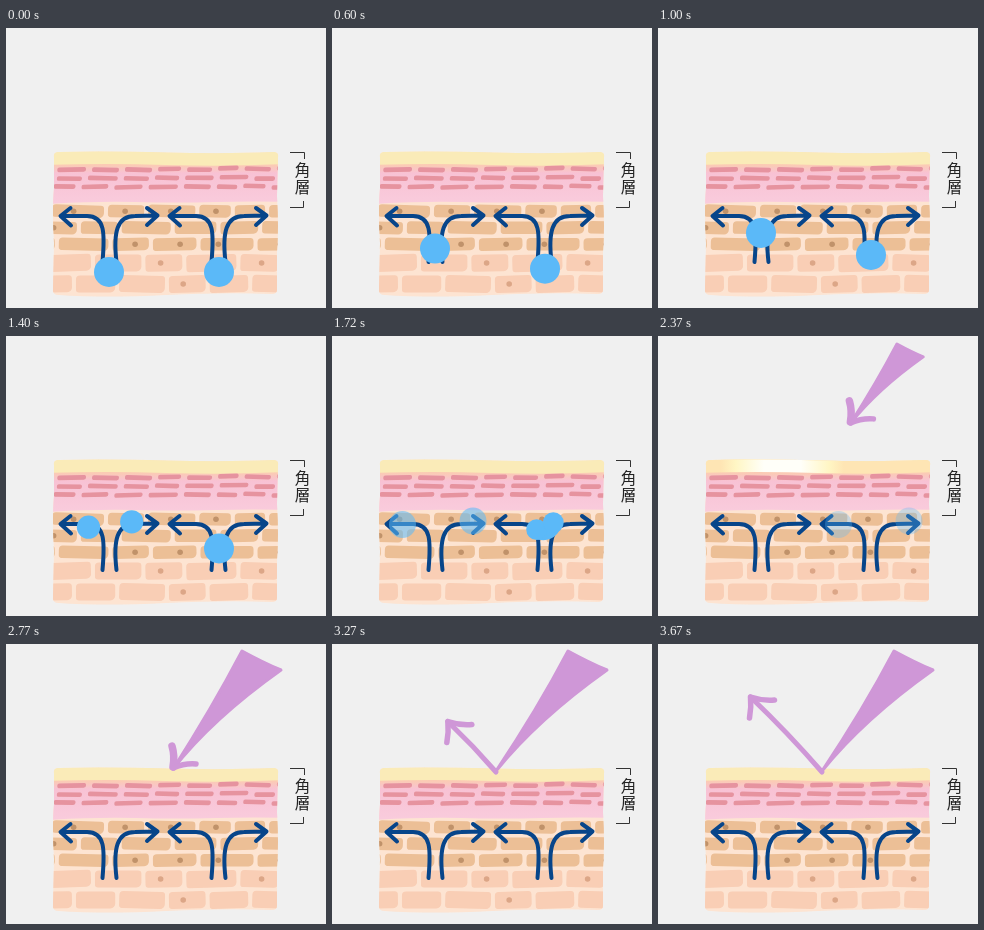
Recreate the animation shown at these times as an HTML page with a canvas. Size 320 by 280 pixels, loop 3970 ms.

```html
<!DOCTYPE html>
<html lang="ja">
<head>
<meta charset="utf-8">
<title>角層</title>
<style>
  html, body { margin: 0; width: 100%; height: 100%; overflow: hidden; background: #f0f0f0; }
  canvas { position: absolute; left: 0; top: 0; width: 320px; height: 280px; }
  .label {
    position: absolute; left: 288px; top: 133px; width: 17px;
    font: 15.5px/17px "Noto Sans CJK JP", "Noto Sans CJK", sans-serif;
    color: #222; text-align: center;
  }
</style>
</head>
<body>
<canvas id="stage"></canvas>
<div class="label">角<br>層</div>
<script>
const LOOP = 3970;
const NAVY = '#07458a', BLUE = '#5bb9f8', PURPLE = '#cf97d7';
const LEFT = 47, RIGHT = 272;
const canvas = document.getElementById('stage');
const ctx = canvas.getContext('2d');
const dpr = window.devicePixelRatio || 1;
canvas.width = 320 * dpr;
canvas.height = 280 * dpr;

const clamp = v => Math.max(0, Math.min(1, v));
const lerp = (a, b, p) => a + (b - a) * p;
const span = (t, a, b) => clamp((t - a) / (b - a));

// Piecewise linear value through [time, value] pairs
function track(t, keys) {
  let [t0, v0] = keys[0];
  for (const [t1, v1] of keys) {
    if (t < t1) return lerp(v0, v1, span(t, t0, t1));
    [t0, v0] = [t1, v1];
  }
  return v0;
}

function seeded(seed) {
  return () => {
    seed = (seed * 16807) % 2147483647;
    return seed / 2147483647;
  };
}

function stroke(d, color, width) {
  ctx.strokeStyle = color;
  ctx.lineWidth = width;
  ctx.stroke(new Path2D(d));
}

function disc(x, y, r, color) {
  ctx.fillStyle = color;
  ctx.beginPath();
  ctx.arc(x, y, r, 0, Math.PI * 2);
  ctx.fill();
}

// Rounded block with slightly uneven, hand-drawn edges
function block(x, y, w, h, r, color) {
  const tilt = Math.sin(x * 1.7 + y * 2.3) * 0.03;
  ctx.save();
  ctx.translate(x + w / 2, y + h / 2);
  ctx.rotate(tilt);
  ctx.fillStyle = color;
  ctx.beginPath();
  ctx.roundRect(-w / 2, -h / 2, w, h, [r, r * 0.8, r * 1.2, r * 0.7]);
  ctx.fill();
  ctx.restore();
}

// Fills a row with pieces of random width
function row(x, minW, varW, gap, rnd, place) {
  while (x < RIGHT) {
    const w = minW + varW * rnd();
    place(x, w);
    x += w + gap;
  }
}

const SKIN = new Path2D('M52 124 Q100 123 160 124.5 T268 124 Q273 124 272 130 L271 168 Q273 200 271 225 L271 262 Q271 266 266 266 Q220 264 160 267 T52 267 Q46 267 47 260 L48 215 Q46 180 48 160 L48 130 Q47 124 52 124Z');
const PINK_LAYER = new Path2D('M40 137 Q100 135 160 137 T280 136 V174 Q250 173 210 174 T130 174 T40 176Z');

function bricks(rnd) {
  let y = 177;
  for (let i = 0; i < 5; i++) {
    const upper = i < 3;
    const h = upper ? 12.5 : 17;
    row(LEFT - 30 * rnd(), 30, 24, 4, rnd, (x, w) => {
      block(x, y, w, h, 4, upper ? '#ecbf96' : '#f9ceb5');
      const at = 0.3 + 0.4 * rnd();
      if (rnd() < 0.45) disc(x + w * at, y + h / 2, 2.8, upper ? '#c0926a' : '#dca687');
    });
    y += h + 4;
  }
}

function dashes(rnd) {
  for (let i = 0; i < 3; i++)
    row(LEFT + 10 * rnd(), 20, 10, 6, rnd, (x, w) =>
      block(x, 138.6 + 9 * i + 2 * (rnd() - 0.5), w, 4.6, 2, '#e6939f'));
}

// A glow sweeps over the top layer from right to left
function shine(t) {
  const p = span(t, 2050, 2580);
  if (p <= 0 || p >= 1) return;
  const x = lerp(300, 10, p);
  const power = Math.sin(Math.PI * p);
  const half = 65 * power;
  ctx.globalAlpha = clamp(power * 3);
  ctx.fillStyle = '#fee5b4';
  ctx.fillRect(40, 120, 240, 20);
  const g = ctx.createLinearGradient(x - half, 0, x + half, 0);
  const white = `rgb(255, 255, ${lerp(200, 255, power ** 2)})`;
  g.addColorStop(0, '#fee5b4');
  g.addColorStop(0.12, '#fff6c4');
  g.addColorStop(0.35, white);
  g.addColorStop(0.65, white);
  g.addColorStop(0.88, '#fff6c4');
  g.addColorStop(1, '#fee5b4');
  ctx.fillStyle = g;
  ctx.fillRect(x - half, 120, 2 * half, 20);
  ctx.globalAlpha = 1;
}

function skin(t) {
  const rnd = seeded(4021);
  ctx.save();
  ctx.clip(SKIN);
  ctx.fillStyle = '#fde4d2';
  ctx.fillRect(40, 120, 240, 150);
  bricks(rnd);
  ctx.fillStyle = '#faebb8';
  ctx.fillRect(40, 120, 240, 20);
  shine(t);
  const pink = ctx.createLinearGradient(0, 137, 0, 174);
  pink.addColorStop(0, '#fbcbb4');
  pink.addColorStop(0.22, '#f8c2d4');
  pink.addColorStop(1, '#f9cbdc');
  ctx.fillStyle = pink;
  ctx.fill(PINK_LAYER);
  dashes(rnd);
  ctx.restore();
}

function forkArrows(dx) {
  ctx.save();
  ctx.translate(dx, 0);
  stroke('M96.5 234 C99 205 99 188 81 188 H55 M64.5 180 L54.5 188 L65 197.5', NAVY, 4);
  stroke('M110.5 234 C107 204 111 188 129 188 L151 187.5 M141 180 L151.5 187.5 L141 197', NAVY, 4);
  ctx.restore();
}

// A drop rises, stretches into a bean, parts in two and fades at the arrow tips
function drop(cx, y, split, alpha) {
  if (alpha <= 0) return;
  if (split <= 0) return disc(cx, y, 15, BLUE);
  const r = track(split, [[0, 15], [0.22, 10], [1, 13.5]]);
  const lx = cx - 32.5 * split ** 0.85, ly = lerp(195, 188.5, split);
  const rx = cx + 38 * split ** 0.95, ry = lerp(187, 185, split);
  ctx.globalAlpha = alpha;
  const neck = 30 * (1 - split / 0.5);
  if (neck > 0) stroke(`M${lx} ${ly} Q${cx + 4} 199 ${rx} ${ry}`, BLUE, neck);
  disc(lx, ly, r, BLUE);
  disc(rx, ry, r, BLUE);
  ctx.globalAlpha = 1;
}

function drops(t) {
  const leftY = t < 100 ? 244 : t < 200 ? 237 : track(t, [[400, 229], [900, 208], [1000, 205], [1180, 193]]);
  const rightY = track(t, [[500, 244], [900, 231], [1000, 227], [1470, 210], [1640, 193]]);
  drop(103, leftY, span(t, 1180, 1560), 1 - span(t, 1580, 1900));
  drop(213, rightY, span(t, 1640, 2040), 1 - span(t, 2040, 2520));
}

// The incoming ray grows out of one point, keeping its shape
function ray(t) {
  if (t < 2190) return;
  const p = 1 - (1 - span(t, 2190, 2770)) ** 3;
  const hit = t >= 3070;
  const at = (x, y) => `${lerp(245, x, p)} ${lerp(10, y, p)}`;
  const tip = hit ? at(164, 127) : at(167, 125);
  const body = `M${at(236, 7)} Q${at(205, 66)} ${tip} Q${at(206, 75)} ${at(275, 26)} Q${at(258, 19)} ${at(236, 7)}Z`;
  ctx.fillStyle = PURPLE;
  ctx.fill(new Path2D(body));
  stroke(body, PURPLE, 3);
  if (hit) return;
  ctx.save();
  ctx.translate(lerp(245, 167, p), lerp(10, 124, p));
  const s = clamp(p * 2);
  ctx.scale(s, s);
  stroke('M-1 -22 Q2 -12 0 -1', PURPLE, 7.5);
  stroke('M0 0 Q12 -5 23 -4', PURPLE, 5.5);
  ctx.restore();
}

// The reflected ray advances in steps of 100 ms
function bounce(t) {
  if (t < 3070) return;
  const k = Math.min(7, Math.floor((t - 3070) / 100) + 1);
  const p = 1 - (1 - k / 7) ** 2;
  const x = 164 - 71.5 * p, y = 128 - 75 * p;
  const mx = (x + 164) / 2 + 2 * p, my = (y + 128) / 2 - 1.5 * p;
  stroke(`M164 128 Q${mx} ${my} ${x} ${y}`, PURPLE, 5);
  stroke(`M${x - 1} ${y + 21} Q${x + 1} ${y + 10} ${x} ${y} Q${x + 12} ${y + 4} ${x + 24} ${y + 3}`, PURPLE, 5.5);
}

function bracket() {
  ctx.lineCap = 'butt';
  ctx.lineJoin = 'miter';
  stroke('M284 124.5 H298.5 V131 M284 179.5 H297.5 V173', '#333', 1);
}

function draw(t) {
  ctx.setTransform(dpr, 0, 0, dpr, 0, 0);
  ctx.lineCap = ctx.lineJoin = 'round';
  ctx.fillStyle = '#f0f0f0';
  ctx.fillRect(0, 0, 320, 280);
  skin(t);
  forkArrows(0);
  forkArrows(109);
  drops(t);
  ray(t);
  bounce(t);
  bracket();
}

const start = performance.now();
function tick() {
  draw((performance.now() - start) % LOOP);
  requestAnimationFrame(tick);
}
tick();
</script>
</body>
</html>
```
